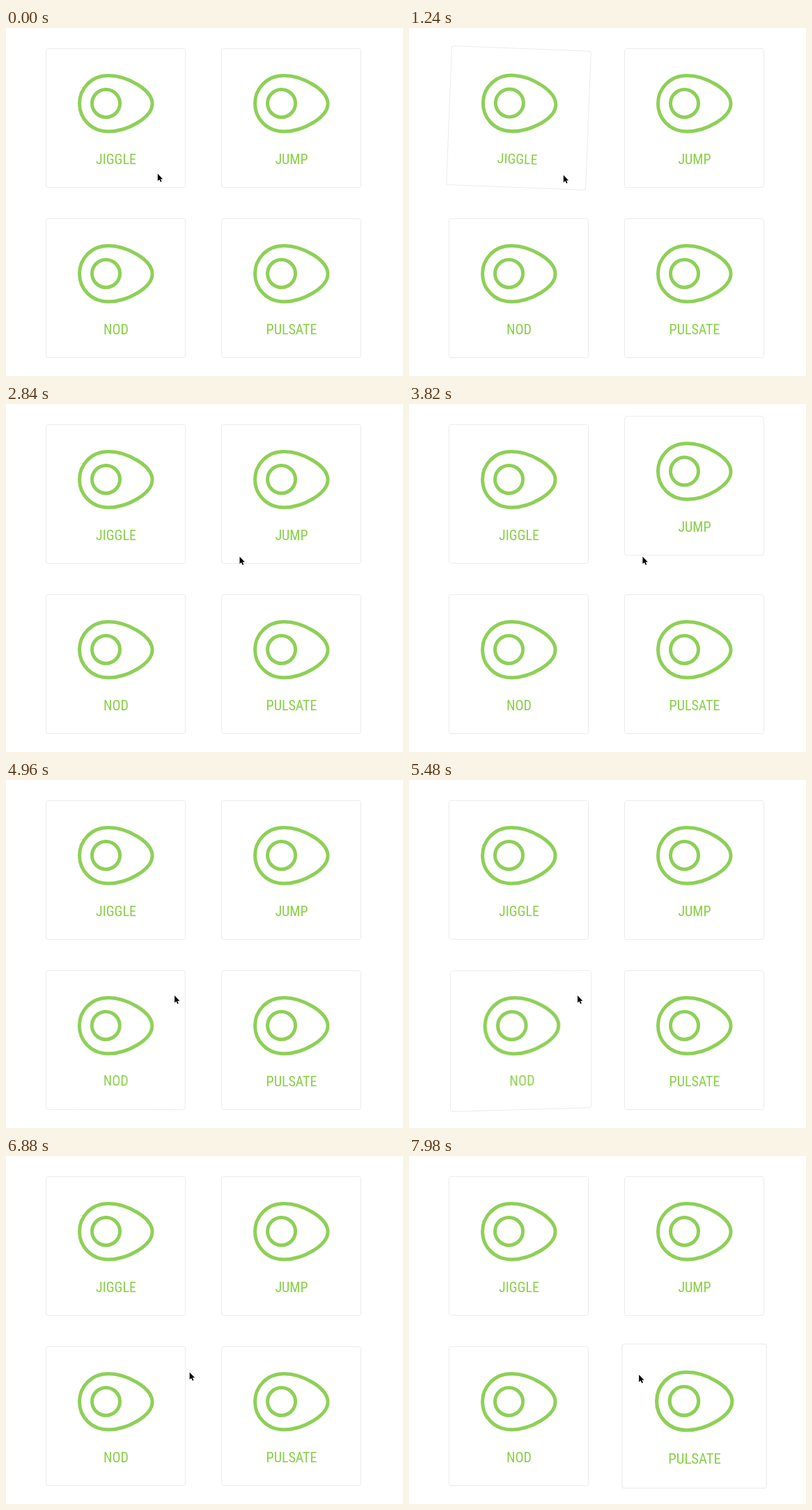
Recreate the animation shown at these times as an HTML page. Size 570 px wide and 501 px high, loop 8 s.

```html
<!DOCTYPE html>
<html lang="en">
<head>
<meta charset="utf-8">
<title>Hover animations</title>
<style>
  html, body { margin: 0; width: 100%; height: 100%; overflow: hidden; background: #fff; }
  #stage {
    position: relative; width: 570px; height: 501px; overflow: hidden;
    perspective: 740px; perspective-origin: 284px 250px;
  }
  .card { position: absolute; width: 201px; height: 201px; }
  svg { display: block; overflow: visible; }
  .frame { fill: #fff; stroke: #ebebeb; }
  .icon { fill: none; stroke: #8ed057; stroke-width: 5; }
  text {
    fill: #87d045; text-anchor: middle;
    font: 400 20px "Roboto Condensed", Roboto, "Open Sans", sans-serif;
    font-stretch: 75%;
  }
  #cursor { position: absolute; left: 0; top: 0; }
  #cursor path { fill: #000; stroke: #fff; stroke-width: 1; paint-order: stroke; }
</style>
</head>
<body>
<div id="stage"></div>
<script>
const LOOP = 8000;
const stage = document.getElementById('stage');

function addCard(label, x, y) {
  const card = document.createElement('div');
  card.className = 'card';
  card.style.left = x + 'px';
  card.style.top = y + 'px';
  card.innerHTML = `<svg width="201" height="201">
    <rect class="frame" x=".5" y=".5" width="200" height="200" rx="3"/>
    <g class="icon">
      <path d="M90 39.5C117 39.5 153 60 153 80C153 100 117 120 90 120C65 120 48.5 101 48.5 79.7C48.5 58.5 65 39.5 90 39.5Z"/>
      <circle cx="86.5" cy="79.5" r="20"/>
    </g>
    <text x="101" y="166.5">${label}</text>
  </svg>`;
  stage.append(card);
  return card;
}

// Cubic bezier (.25, .1, .25, 1), the CSS "ease" curve.
function ease(x) {
  let lo = 0, hi = 1, t = x;
  for (let i = 0; i < 24; i++) {
    t = (lo + hi) / 2;
    if (0.75 * t * (1 - t) + t ** 3 < x) lo = t; else hi = t;
  }
  return 0.3 * t * (1 - t) ** 2 + 3 * t * t * (1 - t) + t ** 3;
}

const smooth = p => p * p * (3 - 2 * p);
const clamp = p => Math.min(1, Math.max(0, p));

// Value of [position, value] keys at phase p, eased per segment.
function sample(keys, p) {
  const i = Math.max(1, keys.findIndex(k => k[0] >= p));
  const [a, u] = keys[i - 1], [b, v] = keys[i];
  return u + (v - u) * ease((p - a) / (b - a));
}

const cards = [
  {
    el: addCard('JIGGLE', 57, 29), start: 430, period: 1020,
    keys: [[0, 0], [.25, 3], [.5, -3], [.75, 3], [1, 0]],
    pose: v => `rotate(${v}deg)`
  },
  {
    el: addCard('JUMP', 309, 29), start: 2950, period: 555,
    keys: [[0, 0], [.5, -14], [1, 0]],
    pose: v => `translateY(${v}px)`
  },
  {
    el: addCard('NOD', 57, 274), start: 4950, period: 780,
    keys: [[0, 0], [.25, -6], [.5, 12], [1, 0]],
    pose: v => `translateX(${v}px) rotateY(${v * 1.2}deg)`
  },
  {
    el: addCard('PULSATE', 309, 274), start: 7430, period: 1200,
    keys: [[0, 1], [.5, 1.037], [1, 1]],
    pose: v => `scale(${v})`
  }
];

stage.insertAdjacentHTML('beforeend', `<svg id="cursor" width="9" height="14">
  <path d="M0 0V10.4L2.4 8.2L4.1 12L5.8 11.2L4.1 7.6H7.3Z"/></svg>`);
const cursor = document.getElementById('cursor');

const home = [217.8, 209.8];
const moves = [
  { from: 10, to: 160, at: [221.8, 211.8] },
  { from: 2460, to: 2840, at: [335.5, 219.8] },
  { from: 4210, to: 4560, at: [242, 310.3] },
  { from: 6710, to: 7240, at: [330.2, 315] }
];

function draw() {
  const t = performance.now() % LOOP;

  for (const { el, start, period, keys, pose } of cards) {
    const n = (t - start) / period;
    el.style.transform = n > 0 && n < 2 ? pose(sample(keys, n % 1)) : 'none';
  }

  let [x, y] = home;
  for (const { from, to, at } of moves) {
    const p = smooth(clamp((t - from) / (to - from)));
    x += (at[0] - x) * p;
    y += (at[1] - y) * p;
  }
  cursor.style.transform = `translate(${x}px, ${y}px)`;
  requestAnimationFrame(draw);
}
draw();
</script>
</body>
</html>
```
